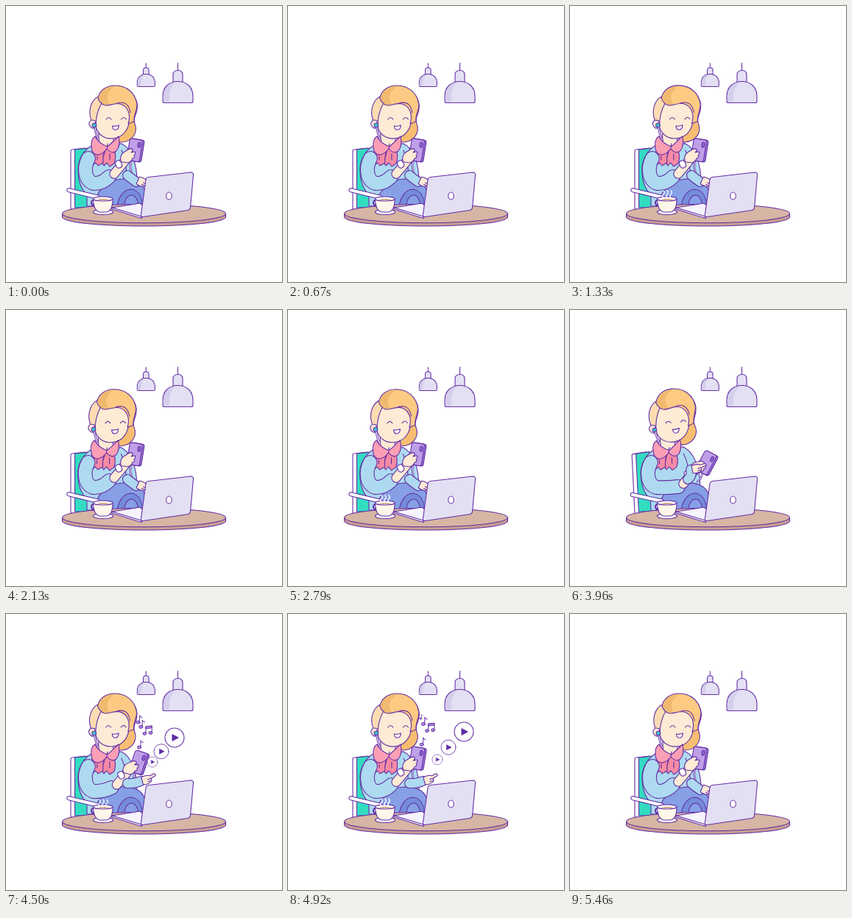
Write an HTML page that moves like this. It is 375x375 px and loops after 5.5 s.

```html
<!DOCTYPE html>
<html lang="en">
<head>
<meta charset="utf-8">
<title>Music break</title>
<style>
  html, body { margin: 0; width: 100%; height: 100%; overflow: hidden; background: #fff; }
  svg { display: block; width: 100%; height: 100%; }
  .ink { stroke: #642fa6; stroke-width: 1.1; stroke-linecap: round; stroke-linejoin: round; }
  .line { fill: none; }
  .skin { fill: #fdebd5; }
  .knit { fill: #addaf0; }
  .metal { fill: #e3e0f3; }
  .shade { stroke: none; }
</style>
</head>
<body>
<svg viewBox="0 0 375 375" class="ink" fill="none">
  <defs>
    <g id="lamp">
      <path d="M0-25V-15" class="line"/>
      <path d="M-6.500 1V-9Q-6.500-15 0-15T6.500-9V1Z" class="metal"/>
      <path d="M-20.500 27V20C-20.500 8-12 0 0 0S20.500 8 20.500 20V27Q20.500 29 18 29H-18Q-20.500 29-20.500 27Z" class="metal"/>
      <path d="M-19.700 27V20C-19.700 10-12 2-3 1C-9 6-12 13-12 28H-18Z" fill="#d3cfec" class="shade"/>
    </g>
    <g id="quaver">
      <path d="M2.200 3V-7Q3-3.600 6-3.800" class="line"/>
      <ellipse cy="3.500" rx="2.800" ry="2.300" fill="#b18be3"/>
    </g>
    <g id="pair">
      <path d="M-2 4V-6L7-7V3" class="line"/>
      <path d="M-2-6L7-7V-4L-2-3Z" fill="#b18be3"/>
      <ellipse cx="-4" cy="4.500" rx="2.600" ry="2.200" fill="#b18be3"/>
      <ellipse cx="5" cy="3.500" rx="2.600" ry="2.200" fill="#b18be3"/>
    </g>
    <g id="play">
      <circle r="13" fill="#fff"/>
      <path d="M-3-4.200L5 0L-3 4.200Z" fill="#5c2ca3"/>
    </g>
    <path id="wisp" d="M0 0Q-2.500-2.500 0-5T0-10"/>
  </defs>

  <use href="#lamp" transform="translate(233.500 102.500)"/>
  <use href="#lamp" transform="translate(190.300 92.500) scale(.585)" stroke-width="1.800"/>

  <g id="chair">
    <path d="M88 197Q88 195 90 195L108 193V276H88Z" fill="#fff"/>
    <path d="M93.500 195L112 193V274H93.500Z" fill="#33dcc0"/>
  </g>

  <g id="body">
    <path d="M119 188C106 195 98 208 98 222C98 240 103 250 110 256V272H162L178 238C178 215 171 194 157 187Z" class="knit"/>
    <path d="M157 196Q165 212 163 236" class="line"/>
  </g>

  <path d="M118 274C121 258 128 248 138 241C148 234 166 233 177 238C188 243 192 253 190 279Z" fill="#869fe5"/>
  <path d="M151 277C151 260 160 249 170 249C180 250 186 260 186 278Z" fill="#748cd9"/>
  <path d="M160 277Q161 258 170 257T181 278" fill="#869fe5"/>

  <g id="upper">
    <g id="hairBack">
      <path d="M150 110C169 111 181 127 178 141C177 149 172 152 175 160C180 173 170 186 154 185L146 178Z" fill="#f7be72"/>
    </g>
    <path d="M126 172V190Q137 197 146 188V174Z" class="skin"/>
    <g id="head">
      <path d="M128 122C118 125 113 136 114 148Q115 155 118 160L128 164L136 135Z" fill="#fbdcb2"/>
      <path d="M130 132C124 142 122 152 122 164C125 175 134 181 145 180C160 179 168 166 168 151C169 137 160 128 145 126Z" class="skin"/>
      <path d="M125 125C127 115 136 108 148 108C164 108 176 118 178 134C178 143 173 148 174 157L166 160C170 148 166 136 155 133C145 131 138 138 132 134Q127 131 125 125Z" fill="#fcca82"/>
      <path d="M126 125C128 116 136 109 148 109C138 116 135 124 141 133.500Q130 136 126 125Z" fill="#efb970" class="shade"/>
      <path d="M150 132.500Q166 127 169 145" class="line"/>
      <path d="M136 154Q139.500 149 143 154M156.500 154Q160 149 163.500 154" class="line"/>
      <path d="M144.500 163Q149 164 153.500 162Q153 168 149 168.300T144.500 163Z" fill="#fff"/>
      <path d="M121 156C115 153 111 158 114 163Q117 168 122 165Z" class="skin"/>
      <circle cx="120" cy="162" r="2.800" fill="#38c9cf"/>
    </g>
    <path id="cableEdge" stroke-width="2.800"/>
    <path id="cableFill" stroke="#fff" stroke-width="1"/>
    <path d="M136 192L130 212L133 217L137 213L141 218L147 214Q151 204 146 191Z" fill="#f58ba5"/>
    <path d="M118 192Q115 206 118 216L122 213L125 217L132 213Q131 204 135 193Z" fill="#f58ba5"/>
    <path d="M121 177Q115 181 116 191Q117 203 126 202Q133 200 137 194Q144 202 150 197Q156 190 153 177Q146 184 138 191Q126 187 121 177Z" fill="#fb9fb5"/>
    <path d="M137 194L138 187M124 204V209M141 201V209" class="line"/>
  </g>

  <path id="cordEdge" stroke-width="2.600"/>
  <path id="cordFill" stroke="#fff" stroke-width=".9"/>
  <path id="sleeveEdge" stroke-width="20"/>
  <path id="sleeveFill" stroke="#addaf0" stroke-width="17.800"/>
  <path id="wristEdge" stroke-width="13.500"/>
  <path id="wristFill" stroke="#fdebd5" stroke-width="11.300"/>

  <g id="phone">
    <rect x="-8.500" y="-15" width="18.500" height="30" rx="3" fill="#9a76d4"/>
    <rect x="-10" y="-15" width="17.500" height="30" rx="3" fill="#bf9fe8"/>
    <rect x="2" y="-11.500" width="3.500" height="7" rx="1.700" fill="#8f66cf"/>
  </g>
  <path id="grip" d="M-11 12C-14 7-12 0-5-3Q1-8 4-5Q5-3 2-1L7-2Q9 0 6 3Q8 6 4 7Q3 11-2 13Z" class="skin"/>
  <rect id="watch" x="-4" y="-5" width="8" height="10" rx="3.500" fill="#fff"/>

  <path id="armEdge" stroke-width="14"/>
  <path id="armFill" stroke="#addaf0" stroke-width="11.800"/>
  <g id="hand">
    <path d="M-3-5Q4-7 9-4L15-5Q18-4 16-2L9 0Q11 3 7 5Q1 7-3 5Z" class="skin"/>
    <path d="M9 0H5M8 3H4" class="line"/>
  </g>

  <path id="armrest" d="M85 247.500L127 257.500V263L84 252.500Q81 249 85 247.500Z" fill="#fff"/>

  <path d="M76.500 282V286.500C77 294 126 299 187.500 299S298 294 298.500 286.500V282Z" fill="#c69d91"/>
  <ellipse cx="187.500" cy="282" rx="111" ry="12.800" fill="#d6b5a4"/>

  <path d="M144 274L182 268L190 274L185 287Z" fill="#f5f3fc"/>
  <path d="M144 274V276L184 288.500V286Z" fill="#fff"/>
  <path d="M190 236Q190.500 233 194 232.500L251 226Q255 226 254.500 230L250.500 274Q250 277 247 277.500L186 286.500Q183 287 183.500 283Z" class="metal"/>
  <ellipse cx="221.500" cy="258" rx="3.800" ry="5" fill="#fff"/>

  <ellipse cx="132" cy="280" rx="13.500" ry="3.500" fill="#fff"/>
  <path d="M121 264C114 262 114 272 123 273" class="line" stroke-width="2"/>
  <path d="M118.500 262Q119 279 128 280H136Q145 279 145 262Z" fill="#fff7ea"/>
  <ellipse cx="131.700" cy="262" rx="13.300" ry="3" fill="#fff"/>
  <path d="M123 263Q132 260.500 141 263Q132 265.500 123 263Z" fill="#d3ab92" class="shade"/>
  <g id="steam" stroke="#fff" stroke-width="1.400">
    <use href="#wisp" x="127" y="261"/>
    <use href="#wisp" x="132" y="261"/>
    <use href="#wisp" x="137" y="261"/>
  </g>

  <g id="notes"></g>
  <g id="plays"></g>
</svg>

<script>
const LOOP = 5500;
const $ = id => document.getElementById(id);
const set = (id, name, value) => $(id).setAttribute(name, value);
const clamp = v => Math.max(0, Math.min(1, v));
const smooth = v => { v = clamp(v); return v * v * (3 - 2 * v); };
const ramp = (t, from, to) => smooth((t - from) / (to - from));
// Eases up over [a, b] and down again over [c, d].
const pulse = (t, a, b, c, d) => ramp(t, a, b) * (1 - ramp(t, c, d));
const rotate = (id, angle, x, y) => set(id, "transform", `rotate(${angle} ${x} ${y})`);
const pose = (id, x, y, angle) => set(id, "transform", `translate(${x} ${y}) rotate(${angle})`);

function limb(name, d) {
  set(name + "Edge", "d", d);
  set(name + "Fill", "d", d);
}

function addUses(parent, count, symbol) {
  return Array.from({ length: count }, (_, i) => {
    const use = document.createElementNS("http://www.w3.org/2000/svg", "use");
    use.setAttribute("href", "#" + symbol(i));
    $(parent).append(use);
    return use;
  });
}
const notes = addUses("notes", 4, i => i === 1 ? "pair" : "quaver");
const plays = addUses("plays", 3, () => "play");

// Moves a symbol out of the phone to (x, y) as it grows.
function emerge(el, x, y, scale, grow) {
  const px = 184 + (x - 184) * grow, py = 198 + (y - 198) * grow;
  el.setAttribute("transform", `translate(${px} ${py}) scale(${scale})`);
  el.setAttribute("visibility", scale > .01 ? "visible" : "hidden");
}

function drawBody(t) {
  const back = pulse(t, 2950, 3960, 4000, 4450);
  const lean = -.3 * (1 - Math.cos(2 * Math.PI * t / LOOP)) - 2.5 * back;
  rotate("chair", -2.8 * back, 100, 276);
  rotate("armrest", -1.4 * back, 115, 276);
  rotate("body", lean * .75, 130, 272);
  rotate("upper", lean * .75, 130, 272);
  rotate("head", lean * .9, 137, 186);
  rotate("hairBack", lean * .9, 137, 186);
  limb("cable", `M${121 + lean * .4} 165Q122 175 126 183`);
  return lean;
}

function drawArms(t, lean) {
  const lower = pulse(t, 2950, 3960, 4000, 5000);
  const px = 176 + 10 * lower, py = 196 + 12 * lower, tilt = 9 + 19 * lower;
  const wx = 153 + 7 * lower, wy = 215 + 8 * lower;
  const sx = 110 + lean * .7;
  limb("cord", `M${px - 6} ${py + 14}Q${px - 9} ${py + 25} 173 233`);
  limb("sleeve", `M${sx + 2} 207C${sx - 5} 220 ${sx - 3} 237 ${sx + 9} 241Q130 242 ${wx - 13} ${wy + 17}`);
  limb("wrist", `M${wx - 6} ${wy + 13}L${wx + 9} ${wy - 5}`);
  pose("watch", wx, wy, -28);
  pose("phone", px, py, tilt);
  pose("grip", 168 + 9 * lower, 200 + 11 * lower, tilt - 9);

  const reach = pulse(t, 2900, 3450, 5000, 5420);
  const tap = pulse(t, 3600, 3900, 4000, 4300);
  const hx = 182 + 6 * reach - 19 * tap;
  const hy = 238 - 15 * reach - 7 * tap + 3 * pulse(t, 4250, 4500, 5000, 5420);
  limb("arm", `M${165 - 5 * tap} 230Q${(164 + hx) / 2} ${(235 + hy) / 2} ${hx - 5} ${hy + 1}`);
  pose("hand", hx, hy, 24 - 40 * reach + 6 * tap);
}

function drawSteam(t) {
  const puff = t * 3 / LOOP % 1;
  set("steam", "opacity", pulse(puff, .32, .5, .7, .85));
  set("steam", "transform", `translate(0 ${4 - puff * 6})`);
}

function drawMusic(t) {
  const drift = (t - 4500) / 1000;
  notes.forEach((el, i) => {
    const grow = ramp(t, 4310 - 60 * i, 4490 - 60 * i);
    const fade = 1 - ramp(t, 5100 - 80 * i, 5240 - 80 * i);
    const x = 185 + 7 * Math.sin(2 * i - .6) + Math.sin(drift * 6);
    const y = 178 - 34 * Math.sqrt(i / 3) - drift * 9;
    emerge(el, x, y, .9 * grow * fade, grow);
  });
  plays.forEach((el, i) => {
    const grow = ramp(t, 4260 - 80 * i, 4490 - 80 * i);
    const fade = 1 - ramp(t, 5270 - 95 * i, 5420 - 95 * i);
    const travel = (4 + 3 * i) * ramp(t, 4500, 4720);
    const x = 199 + 9 * i + 3 * i * i + travel;
    const y = 201 - 12 * i - 2.25 * i * i - travel * .8;
    emerge(el, x, y, (.54 + .23 * i) * grow * fade, grow);
  });
}

function draw(t) {
  drawArms(t, drawBody(t));
  drawSteam(t);
  drawMusic(t);
}

const begin = performance.now();
function frame() {
  draw((performance.now() - begin) % LOOP);
  requestAnimationFrame(frame);
}
draw(0);
frame();
</script>
</body>
</html>
```
